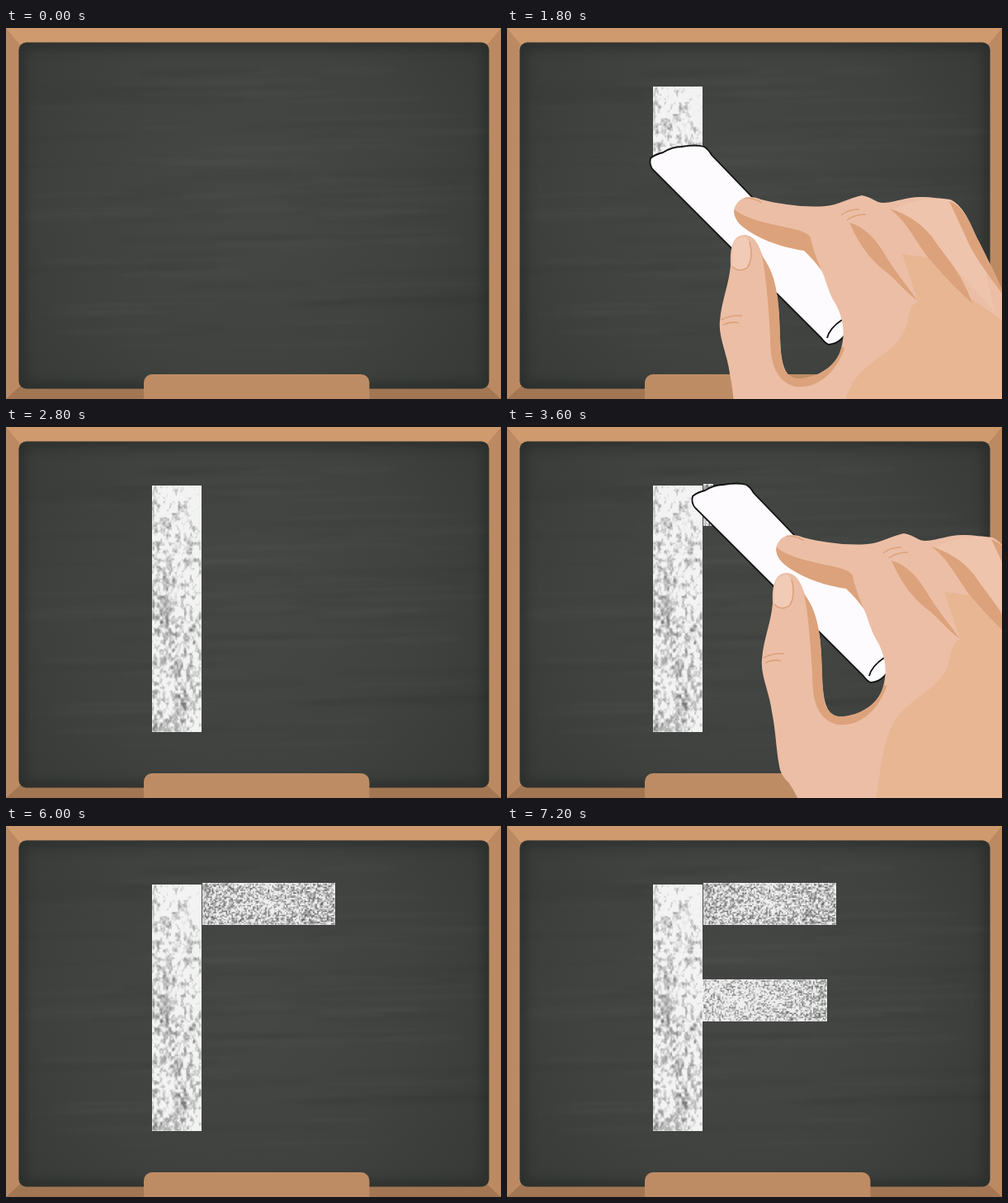
These frames come from a looping animation (600 px wide and 450 px high, 7400 ms). An HTML page with a canvas:

```html
<!DOCTYPE html>
<html lang="en">
<head>
<meta charset="utf-8">
<title>Chalk letter F</title>
<style>
html, body { margin: 0; width: 100%; height: 100%; overflow: hidden; background: #393c39; }
canvas { display: block; width: 600px; height: 450px; }
</style>
</head>
<body>
<canvas id="stage" width="600" height="450"></canvas>
<script>
const W = 600, H = 450, LOOP = 7400, STEP = 200;
const ctx = document.getElementById('stage').getContext('2d');

function layer(w, h, paint) {
  const canvas = document.createElement('canvas');
  canvas.width = w;
  canvas.height = h;
  paint(canvas.getContext('2d'));
  return canvas;
}

function seeded(seed) {
  return () => {
    seed = (seed + 0x6D2B79F5) | 0;
    let v = Math.imul(seed ^ (seed >>> 15), 1 | seed);
    v ^= v + Math.imul(v ^ (v >>> 7), 61 | v);
    return ((v ^ (v >>> 14)) >>> 0) / 4294967296;
  };
}

// Smooth value noise with cells of sx by sy pixels
function noise(seed, sx, sy) {
  const rand = seeded(seed), n = 256;
  const grid = Float32Array.from({ length: n * n }, rand);
  const ease = u => u * u * (3 - 2 * u);
  return (x, y) => {
    x /= sx; y /= sy;
    const i = Math.floor(x), j = Math.floor(y), u = ease(x - i), v = ease(y - j);
    const at = (a, b) => grid[(b % n) * n + a % n];
    const top = at(i, j) * (1 - u) + at(i + 1, j) * u;
    const low = at(i, j + 1) * (1 - u) + at(i + 1, j + 1) * u;
    return top * (1 - v) + low * v;
  };
}

function texture(w, h, shade) {
  return layer(w, h, g => {
    const img = g.createImageData(w, h);
    for (let y = 0; y < h; y++) for (let x = 0; x < w; x++) {
      const k = (y * w + x) * 4, s = Math.max(65, Math.min(247, shade(x, y)));
      img.data.set([s, s, s + 1, 255], k);
    }
    g.putImageData(img, 0, 0);
  });
}

function softChalk(w, h) {
  const blot = noise(4, 17, 24), spot = noise(9, 3.6, 5), grain = noise(2, 1.8, 2.4);
  return texture(w, h, (x, y) => {
    const dirt = spot(x, y) * 0.55 + grain(x, y) * 0.28 + blot(x, y) * 0.3 + 0.12 * Math.min(1, 2 * y / h);
    return 243 - 225 * Math.max(0, dirt - 0.58);
  });
}

function grainyChalk(w, h, seed, lightX, base) {
  const grain = noise(seed, 1.7, 1.7), spot = noise(seed + 1, 3, 3);
  return texture(w, h, (x, y) => {
    const edge = Math.hypot((x - lightX) / 110, (y - h / 2) / 45);
    const dirt = grain(x, y) * 0.72 + spot(x, y) * 0.28 + 0.18 * Math.min(1.2, edge);
    return 238 - 225 * Math.max(0, dirt - base);
  });
}

function poly(g, color, points) {
  g.fillStyle = color;
  g.beginPath();
  points.forEach(p => g.lineTo(...p));
  g.fill();
}

function box(g, x, y, w, h, r) {
  g.beginPath();
  g.roundRect(x, y, w, h, r);
}

const board = layer(W, H, g => {
  g.fillStyle = '#bc8a62';
  g.fillRect(0, 0, W, H);
  poly(g, '#cf9a6d', [[0, 0], [W, 0], [580, 24], [20, 24]]);
  poly(g, '#a27653', [[0, H], [W, H], [578, 430], [22, 430]]);

  g.save();
  box(g, 15.5, 17.5, 570, 420, 9);
  g.clip();
  const glow = g.createRadialGradient(290, 210, 40, 290, 210, 350);
  glow.addColorStop(0, '#444743');
  glow.addColorStop(0.55, '#3f423f');
  glow.addColorStop(1, '#373a37');
  g.fillStyle = glow;
  g.fillRect(0, 0, W, H);

  const rand = seeded(31);
  g.filter = 'blur(2px)';
  for (let i = 0; i < 90; i++) {
    const x = 60 + rand() * 480, y = 50 + rand() * 340;
    g.fillStyle = rand() < 0.6 ? 'rgba(255,255,255,.015)' : 'rgba(0,0,0,.027)';
    g.beginPath();
    g.ellipse(x, y, 40 + rand() * 100, 1.5 + rand() * 4, -0.02, 0, 7);
    g.fill();
  }
  g.filter = 'blur(7px)';
  g.strokeStyle = 'rgba(20,24,21,.42)';
  g.lineWidth = 12;
  box(g, 15.5, 17.5, 570, 420, 9);
  g.stroke();
  g.restore();

  g.fillStyle = '#be8c64';
  box(g, 167, 420, 273.5, 50, 10);
  g.fill();
});

// Each bar is uncovered just behind the chalk; the hand is shown from start to end.
const bars = [
  { x: 177, y: 71, w: 60, h: 299, start: 1600, end: 2600, down: true,
    hand: s => [-51, s * 0.37], lead: 12, skin: softChalk(60, 299) },
  { x: 238, y: 69, w: 161, h: 51, start: 3600, end: 4400,
    hand: s => [s * 0.198, 0], lead: 12, skin: grainyChalk(161, 51, 12, 75, 0.4) },
  { x: 237, y: 186, w: 151, h: 51, start: 6400, end: 7200,
    hand: s => [13 + s * 0.198, 117], lead: 13, skin: grainyChalk(151, 51, 20, 45, 0.46) }
];

function drawBar(bar, t) {
  if (t < bar.start) return;
  let { w, h } = bar;
  if (t < bar.end) {
    const [dx, dy] = bar.hand(t - bar.start);
    if (bar.down) h = Math.min(h, dy + bar.lead);
    else w = Math.min(w, dx + bar.lead);
  }
  ctx.drawImage(bar.skin, 0, 0, w, h, bar.x, bar.y, w, h);
  ctx.fillStyle = 'rgba(255,255,255,.4)';
  ctx.fillRect(bar.x, bar.y, w, 1);
  ctx.fillRect(bar.x, bar.y, 1, h);
  if (t >= bar.end) {
    ctx.fillRect(bar.x, bar.y + h - 1, w, 1);
    ctx.fillRect(bar.x + w - 1, bar.y, 1, h);
  }
}

const stick = new Path2D('M228 98Q223 92 225 84Q231 79 240 77Q251 70 262 70Q280 67 290 70Q295 73 299 80L347 130L435 218L466 285Q460 308 441 310Q436 308 432 302Z');
const stickEnd = new Path2D('M439 302Q442 290 457 280');
const skin = new Path2D('M358 462Q351 446 342 432Q331 422 330 411C326 390 326 370 321 345C318 322 307 300 309 282C311 256 320 238 322 214C321 190 326 177 339 177C353 178 357 192 362 205C379 228 381 262 382 300C383 330 386 349 402 351C424 352 450 338 456 315C461 296 459 280 450 262C440 247 438 231 432 220Q423 207 411 196C380 192 352 179 338 168C325 158 323 146 331 137C338 129 350 130 359 134C382 140 412 144 437 142C452 141 466 132 481 129C494 131 499 139 508 138C524 137 534 131 552 131C567 131 577 133 588 134C607 142 615 171 623 185C637 213 646 230 654 252Q690 340 720 462Z');
const details = [
  ['#e8b692', 'M549 257C535 264 541 281 530 298C516 322 484 331 468 360C453 389 452 425 446 462H720V330L615 255C595 240 580 223 567 205L530 200Z'],
  ['#dca27b', 'M326 145C338 157 367 163 390 168C404 171 414 173 419 180Q421 193 432 220L411 196C380 192 348 178 336 167Q325 157 326 145Z'],
  ['#dca27b', 'M360 202C365 227 368 262 370 300C370 332 376 354 400 361C426 364 449 346 460 315L456 310C448 339 423 352 402 351C384 348 383 330 382 300C381 262 379 228 362 205Z'],
  ['#efc4ac', 'M520 146C538 135 568 132 588 134C607 142 615 171 623 185L642 270C615 239 589 215 567 184C552 167 537 157 520 146Z'],
  ['#dca27b', 'M466 162C484 167 497 181 508 199C520 220 535 237 549 257C533 246 521 229 508 220C493 208 478 190 466 162Z'],
  ['#dca27b', 'M514 145C535 151 552 162 566 179C583 205 601 220 615 260C595 242 578 224 562 205C546 185 535 159 514 145Z'],
  ['#dca27b', 'M587 136C607 142 615 171 623 185C637 213 646 230 654 252C632 222 616 202 606 177Z'],
  ['#f1cbb6', 'M324 196C325 183 333 178 341 180C348 187 349 207 343 216C337 222 327 220 324 215Z']
].map(([color, d]) => [color, new Path2D(d)]);
const creases = new Path2D('M311 280Q322 274 336 275M313 286Q324 281 332 284M456 153Q466 145 478 146M463 159Q472 152 486 152M324 215Q333 224 343 216Q350 204 345 185M338 132Q351 132 360 138');

function drawHand([dx, dy]) {
  ctx.save();
  ctx.translate(dx, dy);
  ctx.fillStyle = '#fdfbfe';
  ctx.fill(stick);
  ctx.strokeStyle = '#111';
  ctx.lineWidth = 1.8;
  ctx.stroke(stick);
  ctx.stroke(stickEnd);
  ctx.fillStyle = '#ecbea6';
  ctx.fill(skin);
  ctx.clip(skin);
  for (const [color, path] of details) {
    ctx.fillStyle = color;
    ctx.fill(path);
  }
  ctx.strokeStyle = '#dca27b';
  ctx.lineWidth = 1.5;
  ctx.stroke(creases);
  ctx.restore();
}

function draw(t) {
  ctx.drawImage(board, 0, 0);
  bars.forEach(bar => drawBar(bar, t));
  const active = bars.find(bar => t >= bar.start && t < bar.end);
  if (active) drawHand(active.hand(t - active.start));
}

const began = performance.now();
function tick() {
  const t = (performance.now() - began) % LOOP;
  draw(Math.floor(t / STEP) * STEP);
  requestAnimationFrame(tick);
}
tick();
</script>
</body>
</html>
```
